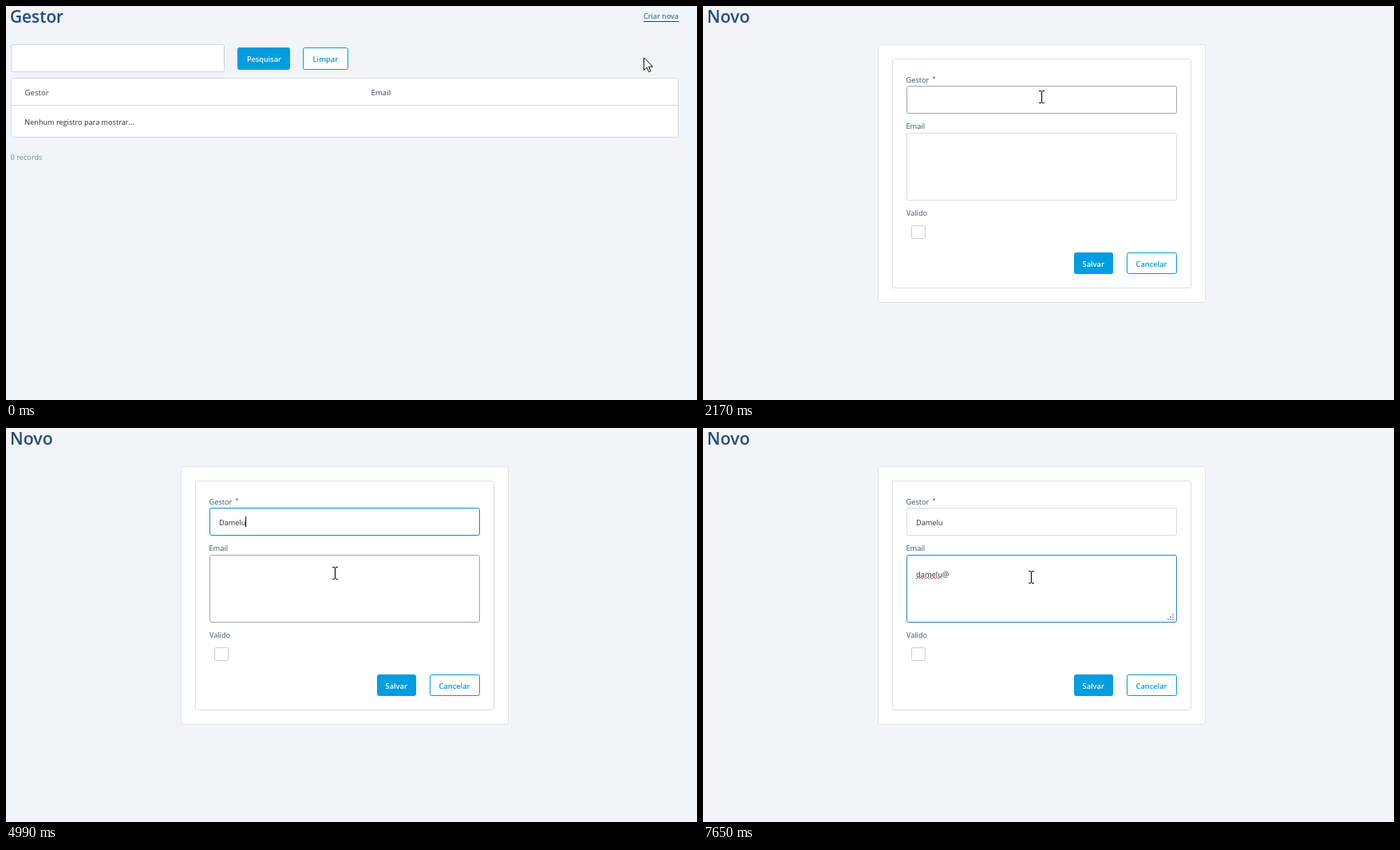
An HTML page for the animation above (8 s loop, 866 px wide and 494 px high).

```html
<!DOCTYPE html>
<html lang="pt">
<head>
<meta charset="utf-8">
<title>Gestor</title>
<style>
html, body { margin: 0; width: 100%; height: 100%; overflow: hidden; background: #f1f5f8; }
svg { display: block; width: 100vw; height: 100vh; }
text { font-family: "Open Sans", "Noto Sans", sans-serif; white-space: pre; }
</style>
</head>
<body>
<svg id="stage" viewBox="0 0 866 494"></svg>
<script>
const LOOP = 8000;
const NAME = 'Damelu', MAIL = 'damelu@';
const BLUE = '#009de0', LINE = '#d9dde1', HOVER = '#a0a7b0', INK = '#2b3036', LABEL = '#3c5068';
const stage = document.getElementById('stage');

function add(parent, tag, attrs) {
  const el = document.createElementNS('http://www.w3.org/2000/svg', tag);
  for (const k in attrs) el.setAttribute(k, attrs[k]);
  parent.appendChild(el);
  return el;
}
const group = (parent = stage) => add(parent, 'g', {});

// Bordered box given by its outer pixel edges.
function box(parent, x1, y1, x2, y2, stroke = LINE, fill = '#fff', r = 2) {
  return add(parent, 'rect', { x: x1 + .5, y: y1 + .5, width: x2 - x1 - 1, height: y2 - y1 - 1, rx: r, fill, stroke });
}
function label(parent, str, x, y, size, fill, weight = 400) {
  const el = add(parent, 'text', { x, y, 'font-size': size, 'font-weight': weight, fill });
  el.textContent = str;
  return el;
}
const show = (el, on) => el.setAttribute('visibility', on ? 'inherit' : 'hidden');
const within = (t, spans) => spans.some(([a, b]) => t >= a && t < b);

add(stage, 'rect', { width: 866, height: 494, fill: '#f1f5f8' });

// List page
const list = group();
label(list, 'Gestor', 5, 21, 20.8, '#1f4b82', 600);
const link = label(list, 'Criar nova', 799, 16, 9.2, '#1f4b82');
const rule = add(list, 'rect', { x: 799, y: 19, width: 44, height: 1 });
box(list, 6, 48, 274, 83, '#cfd4d9');
box(list, 290, 52, 356, 80, BLUE, BLUE);
label(list, 'Pesquisar', 302, 70, 9.15, '#fff', 600);
box(list, 372, 52, 429, 80, BLUE);
label(list, 'Limpar', 384.5, 70, 9.3, '#0a97d6', 600);
box(list, 6, 90, 843, 165, LINE, '#fff', 3);
add(list, 'rect', { x: 7, y: 124, width: 835, height: 1, fill: LINE });
label(list, 'Gestor', 23.6, 112, 9.6, '#3a4350');
label(list, 'Email', 457.4, 112, 9.7, '#3a4350');
label(list, 'Nenhum registro para mostrar...', 23.3, 149, 9.15, INK);
label(list, '0 records', 5.6, 193, 9.2, '#7b8791');

// Form page
const form = group();
label(form, 'Novo', 5, 21, 21.3, '#2a4d78', 600);
box(form, 219, 48, 630, 372, '#dfe3e6', '#fff', 3);
box(form, 237, 66, 612, 354, '#dcdfe2');
label(form, 'Gestor', 254.6, 96, 9.2, LABEL);
label(form, '*', 287.6, 93, 7, LABEL);
label(form, 'Email', 254.4, 154, 9.3, LABEL);
label(form, 'Valido', 255, 263, 9.1, LABEL);
const input = box(form, 255, 100, 594, 135);
const area = box(form, 255, 159, 594, 244);
box(form, 261, 275, 279, 292, '#c9ced3');
box(form, 465, 309, 514, 336, BLUE, BLUE);
label(form, 'Salvar', 475.6, 327, 9.25, '#fff', 600);
box(form, 531, 309, 594, 336, BLUE);
label(form, 'Cancelar', 542.6, 327, 9.25, '#0a93d0', 600);
const nameText = label(form, '', 267, 122, 9.2, INK);
const mailText = label(form, '', 267, 187, 9.35, INK);
const caret = add(form, 'rect', { width: 1, height: 13, fill: '#111' });

const grip = group(form);
for (let r = 0; r < 3; r++)
  for (let c = 0; c <= r; c++)
    add(grip, 'rect', { x: 588 - 3 * c, y: 233 + 3 * r, width: 2, height: 2, fill: '#b4b4b4' });

let zig = 'M267 189';
for (let i = 1; i <= 16; i++) zig += `L${267 + 2 * i} ${i % 2 ? 187.3 : 189}`;
const squiggle = add(form, 'path', { d: zig, fill: 'none', stroke: '#d43a3a', 'stroke-width': .9 });

// Pointer shapes, each with its hot spot at 0,0
const ring = add(stage, 'circle', { r: 12.2, fill: '#ff0', 'fill-opacity': .47 });
const pointer = group();
const outline = { fill: '#fff', stroke: '#111', 'stroke-linejoin': 'round' };
const shapes = {
  arrow: add(pointer, 'path', { d: 'M.5 .8V16.6L4.2 13L6.7 18.6L8.9 17.7L6.5 12.1H11.6Z', ...outline }),
  hand: add(pointer, 'path', {
    d: 'M0 14V2.2Q0 .6 1.6 .6T3.2 2.2V7.6Q4.6 6.6 5.9 8Q7.4 7.2 8.6 8.8Q11.4 8.4 11.4 11V15.5Q11.4 18 9.6 20.4V23.4H1.6V21.2'
      + 'Q-.5 19.4 -2.2 16.2Q-4.2 13.4 -4.2 12.4Q-3.6 10.8 -2 11.6Q-.8 12.4 0 14ZM3.2 7.6V11.5M5.9 8V12M8.6 8.8V12.5',
    ...outline, 'stroke-width': 1.2
  }),
  beam: add(pointer, 'path', { d: 'M-3 -7.5H0M1 -7.5H4M.5 -7V7M-3 7.5H0M1 7.5H4', fill: 'none', stroke: '#111', 'stroke-width': 1.2 })
};

// Moves: start, step length, steps, from, to
const moves = [
  [80, 76, 6, [799, 64], [814, 11]],
  [1620, 78.5, 8, [814, 11], [424, 114]],
  [4610, 78, 6, [424, 114], [411, 187]]
];
const clicks = [[700, 860], [2330, 2490], [5070, 5230]];
const nameKeys = [[3180, 2], [3270, 4], [3500, 5], [3590, 6]];
const mailKeys = [[5860, 1], [6090, 2], [6230, 3], [6390, 4], [6630, 5], [6780, 6], [7650, 7]];
const caretOn = [[2330, 2800], [3180, 4060], [4520, 5540], [5860, 7100]];

const ease = p => p * p * (3 - 2 * p);
function position(t) {
  let pos = moves[0][3];
  for (const [start, step, count, a, b] of moves) {
    if (t < start) break;
    const p = ease(Math.min(1, (Math.floor((t - start) / step) + 1) / count));
    pos = a.map((v, i) => Math.round(v + (b[i] - v) * p));
  }
  return pos;
}
const typed = (str, keys, t) => str.slice(0, keys.reduce((n, [at, len]) => t >= at ? len : n, 0));

function draw(t) {
  const onForm = t >= 1240;
  const [x, y] = position(t);
  show(list, !onForm);
  show(form, onForm);

  const onLink = !onForm && y < 20;
  const overX = onForm && x >= 255 && x < 594;
  const overInput = overX && y >= 100 && y < 135;
  const overArea = overX && y >= 159 && y < 244;
  const kind = onLink || (onForm && t < 1620) ? 'hand' : overInput || overArea ? 'beam' : 'arrow';
  for (const k in shapes) show(shapes[k], k === kind);
  pointer.setAttribute('transform', `translate(${x} ${y})`);
  ring.setAttribute('cx', x);
  ring.setAttribute('cy', y);
  show(ring, within(t, clicks));

  link.setAttribute('fill', onLink ? '#3289d3' : '#1f4b82');
  rule.setAttribute('fill', onLink ? '#3289d3' : '#1f4b82');

  const idle = t < 1390 ? '#e9ecee' : LINE;
  const inInput = t >= 2330 && t < 5070, inArea = t >= 5070;
  input.setAttribute('stroke', inInput ? (t < 2490 ? '#5a9cc0' : '#0a8fcb') : overInput ? HOVER : idle);
  area.setAttribute('stroke', inArea ? (t < 5230 ? '#6a9cc0' : '#2b82bd') : overArea ? HOVER : idle);
  show(grip, inArea);

  nameText.textContent = typed(NAME, nameKeys, t);
  mailText.textContent = typed(MAIL, mailKeys, t);
  show(squiggle, t >= 7650);

  const blink = onForm && within(t, caretOn);
  show(caret, blink);
  if (blink) {
    const field = inArea ? mailText : nameText;
    caret.setAttribute('x', Math.round(267 + field.getComputedTextLength()));
    caret.setAttribute('y', inArea ? 176 : 111);
  }
}

const begin = performance.now();
function frame() {
  draw((performance.now() - begin) % LOOP);
  requestAnimationFrame(frame);
}
frame();
</script>
</body>
</html>
```
